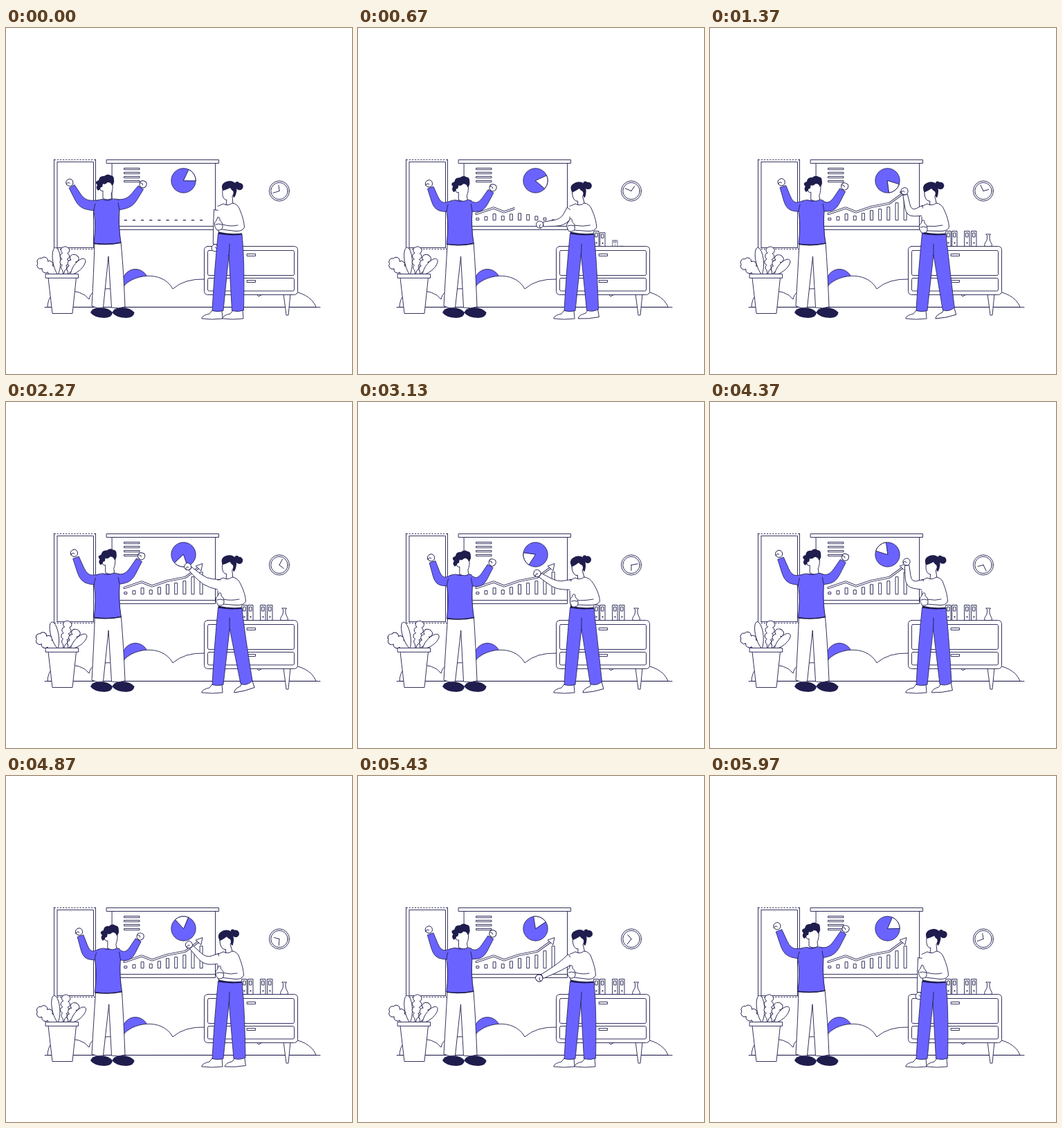
An HTML page that plays this animation: 500x500 px, repeating every 6 s.

```html
<!DOCTYPE html>
<html lang="en">
<head>
<meta charset="utf-8">
<title>Presentation</title>
<style>
  html, body { margin: 0; width: 100%; height: 100%; overflow: hidden; background: #fff; }
  svg { display: block; width: 100vw; height: 100vh; }
  .o { fill: #fff; stroke: #1f1d4d; stroke-width: .9; stroke-linejoin: round; stroke-linecap: round; }
  .b { fill: #6a63ff; stroke: #1f1d4d; stroke-width: .8; stroke-linejoin: round; }
  .l { fill: none; stroke: #1f1d4d; stroke-width: .9; stroke-linejoin: round; stroke-linecap: round; }
  .d { fill: #1f1d4d; }
  .w { fill: #fff; }
  .f { fill: #6a63ff; }
</style>
</head>
<body>
<svg viewBox="0 0 500 500">
  <defs>
    <clipPath id="reveal"><rect id="wipe" x="166" y="228" width="0" height="46"/></clipPath>
    <g id="fist">
      <path class="o" d="M-5 1Q-6-4-1-5Q4-6 5-1Q5 4 1 5Q-4 5-5 1Z"/>
      <path class="l" d="M-5 0Q-1-2 0 1"/>
    </g>
    <path id="shoe" class="d" d="M122 411Q124 405 134 404Q147 403 154 411Q154 418 142 419Q126 418 122 411Z"/>
    <path id="sole" class="o" d="M283 419Q284 415 294 413L298 408H312L313 420Q298 422 283 420Z"/>
  </defs>

  <!-- garden and floor -->
  <path class="l" d="M56 403.5H454"/>
  <circle class="b" cx="187" cy="367" r="18.5"/>
  <path class="o" d="M60 403Q61 381 82 380Q110 378 120 392Q122 378 142 377Q158 377 169 375C180 357 225 348 241 377Q258 362 287 363C330 366 355 375 365 388C383 376 436 373 448 403Z"/>

  <!-- poster -->
  <path class="l" d="M69.500 190V319M74 194V318M126.500 194V318M129.500 190V319M74 193.500H126M74 317.500H126"/>
  <path class="l" stroke-dasharray="1.5 2.6" d="M70 190.500H129M70 319.500H129"/>

  <!-- screen -->
  <rect class="o" x="153.500" y="195" width="149" height="96.500"/>
  <path class="l" d="M153 286.500H302"/>
  <rect class="o" x="145.500" y="190.500" width="162" height="5"/>
  <g id="rows"></g>
  <circle class="b" cx="256.500" cy="220.500" r="17.700"/>
  <path id="slice" class="o"/>
  <g id="bars"></g>
  <g clip-path="url(#reveal)">
    <path class="l" style="stroke-width:3.2" d="M171 268.5L196 260L211 266L233 258.5L259 253.5L279 239"/>
    <path class="l" style="stroke:#fff;stroke-width:1.5" d="M171 268.5L196 260L211 266L233 258.5L259 253.5L279 239"/>
    <path class="o" d="M274.5 237L284 233.5L282 243.5Z"/>
  </g>

  <!-- clock -->
  <circle class="o" cx="395" cy="235.500" r="14.600"/>
  <circle class="l" cx="395" cy="235.500" r="12.200"/>
  <g id="clock"><path class="l" d="M395 235.5L386 238.4M395 235.5L394 227.5"/></g>

  <!-- cabinet -->
  <g id="books"></g>
  <g id="vase"><path class="o" d="M399 298H405.500L404 300V304Q404 307 406 310Q409 315 406 315.500H398.500Q395 315 398 310Q400.500 307 400.500 304V300Z"/></g>
  <path class="o" d="M401 384L405 415H408L411 384Z"/>
  <rect class="o" x="286.500" y="315.500" width="135" height="70" rx="5"/>
  <rect class="o" x="291.500" y="321.500" width="125" height="36" rx="2"/>
  <rect class="o" x="291.500" y="361.500" width="125" height="18.500" rx="2"/>
  <rect class="o" x="348.500" y="326.500" width="12" height="3"/>
  <rect class="o" x="348.500" y="364.500" width="12" height="3"/>

  <!-- plant -->
  <g id="plant"></g>
  <path class="o" d="M61 361L67 412.500H96L101.500 361Z"/>
  <rect class="o" x="57.500" y="355.500" width="47" height="5.800"/>

  <!-- man -->
  <use href="#shoe"/><use href="#shoe" x="31.500"/>
  <path id="trousers" class="o"/>
  <path id="armL" class="b"/><path id="armR" class="b"/>
  <use id="fistL" href="#fist"/><use id="fistR" href="#fist"/>
  <g id="chest">
    <path class="f" d="M131 249Q146 246 162 248L164 258Q163 285 166 310Q147 314 127 311Q130 285 127.500 263Z"/>
    <path class="l" d="M129 254Q126 264 127.500 268Q130 285 127 311Q147 314 166 310Q162 285 164 264L162 253M131 249.500Q135 247.500 140 247.500Q147 251 154 247Q160 246.500 163 248.500"/>
    <path class="d" d="M127 310.500Q147 313.500 166 309.500V311Q147 315 127 312.200Z"/>
  </g>
  <g id="headM">
    <path class="o" d="M139 222L138 229Q134 231 137 235Q139 236 140 235L140 246Q147 250 153 246L152 240Q155 234 154 222Z"/>
    <path class="d" d="M133 235Q129 231 132 227Q127 222 134 220Q135 213 142 214Q147 210 151 213Q156 213 156 219Q157 225 153 228Q152 223 147 223Q143 227 140 225L139 230Q136 229 136 233Z"/>
  </g>

  <!-- woman -->
  <use href="#sole"/>
  <use id="step" href="#sole"/>
  <path id="pointer" class="o"/>
  <use id="fistW" href="#fist"/>
  <path id="pants" class="b"/>
  <path id="seam" class="l"/>
  <g id="headW">
    <path class="o" d="M314 231Q311.500 239 314 245Q316 249 319 248.500L318 255Q324 258 328 254L327 243Q332 238 330 230Z"/>
    <path class="d" d="M313 235Q310 226 316 223Q326 218 333 226Q335 237 330 245Q328 245 328 241Q330 236 326 234L324 231Q318 234 313 235Z"/>
    <circle class="d" cx="337.500" cy="229" r="5.200"/>
    <circle class="d" cx="334" cy="225" r="3"/>
  </g>
  <path id="topFill" class="w"/>
  <path id="topLine" class="l"/>
  <path class="d" d="M307 294.500Q324 298.500 341 296.500V298.800Q323 300.500 306.500 297.500Z"/>
  <path id="clutch" class="o" d="M302 287Q300 281 303.500 279L305.500 274.500Q309.500 272 309 278Q313.500 281 313 288Q312 293 305 292ZM303 284Q307 282 312 284"/>
</svg>
<script>
const LOOP = 6000;
const TIMES = [0, 1370, 2270, 3130, 4370, 5430, 5970];
const $ = id => document.getElementById(id);
const set = (id, key, val) => $(id).setAttribute(key, val);
const move = (id, x, y, turn = 0) => set(id, 'transform', `translate(${x} ${y}) rotate(${turn})`);
const mix = (a, b, p) => a.map((v, i) => v + (b[i] - v) * p);
const smooth = p => p * p * (3 - 2 * p);
const wave = (t, period) => (1 - Math.cos(2 * Math.PI * t / period)) / 2;
const grow = (t, start, span) => smooth(Math.min(1, Math.max(0, (t - start) / span)));
const polar = ([x, y], r, deg) => {
  const a = deg * Math.PI / 180;
  return [x + r * Math.cos(a), y + r * Math.sin(a)];
};

// Monotone cubic through values placed at TIMES
function track(vals) {
  const rate = i => (vals[i + 1] - vals[i]) / (TIMES[i + 1] - TIMES[i]);
  const slope = vals.map((_, i) => {
    if (i === 0 || i === vals.length - 1) return 0;
    const a = rate(i - 1), b = rate(i);
    return a * b > 0 ? 2 * a * b / (a + b) : 0;
  });
  return t => {
    const last = TIMES.length - 1;
    if (t >= TIMES[last]) return vals[last];
    const i = TIMES.findIndex(k => k > t) - 1;
    const h = TIMES[i + 1] - TIMES[i], u = (t - TIMES[i]) / h, v = 1 - u;
    return vals[i] * v * v * (1 + 2 * u) + vals[i + 1] * u * u * (3 - 2 * u)
      + h * (slope[i] * u * v * v - slope[i + 1] * u * u * v);
  };
}

// Tapered limb from shoulder s over elbow e to wrist w, with half widths a, b, c
function limb(s, e, w, a, b, c) {
  const shift = (p, q, r) => {
    const dx = q[0] - p[0], dy = q[1] - p[1], n = Math.hypot(dx, dy) || 1;
    return [-dy / n * r, dx / n * r];
  };
  const n1 = shift(s, e, a), n2 = shift(s, w, b), n3 = shift(e, w, c);
  const edge = d => {
    const at = (p, n) => p.map((v, i) => v + n[i] * d);
    const top = at(s, n1), bend = at(e, n2), end = at(w, n3);
    return [top, mix(top, bend, .55), bend, mix(end, bend, .6), end];
  };
  const l = edge(1), r = edge(-1);
  return `M${l[0]}L${l[1]}Q${l[2]} ${l[3]}L${l[4]}L${r[4]}L${r[3]}Q${r[2]} ${r[1]}L${r[0]}Z`;
}

// Static repeats
$('rows').innerHTML = [0, 1, 2, 3].map(i =>
  `<rect class="o" x="171" y="${202.5 + 6 * i}" width="22" height="2.2"/>`).join('');

const HEIGHTS = [3, 5, 9, 6, 10, 14, 16, 19, 25, 32];
$('bars').innerHTML = HEIGHTS.map((_, i) =>
  `<rect class="o" x="${171.2 + 12.15 * i}" width="3.6"/>`).join('');
const bars = [...$('bars').children];

const BOOKS = [341, 350, 368, 378];
$('books').innerHTML = BOOKS.map(x => `<g><rect class="o" x="${x}" y="293.500" width="7" height="22"/>
  <rect class="o" x="${x + 2}" y="296" width="3" height="6"/><circle class="d" cx="${x + 3.5}" cy="310.500" r="1.100"/></g>`).join('');
const props = [...$('books').children, $('vase')];

// x, tilt, length, half width, lobes (0 = plain), sway
const LEAVES = [
  [75, -52, 38, 11, 3, -6],
  [75, -5, 40, 6, 0, -9],
  [83, 4, 46, 6, 4, 6],
  [89, 22, 35, 6, 3, 6],
  [93, 42, 31, 6, 0, 7]
];
function leafPath(len, w, lobes) {
  if (!lobes) return `M0 0C${-w * 1.5} ${-len * .4} ${-w} ${-len} 0 ${-len}C${w} ${-len} ${w * 1.5} ${-len * .4} 0 0Z`;
  const pts = [], r = len * .4 / lobes;
  for (let i = 1; i <= lobes; i++) pts.push([w * (.25 + .35 * Math.sin(i / lobes * 2.6)), -len * (.12 + .76 * i / lobes)]);
  const arc = (x, y) => `A${r} ${r} 0 0 1 ${x} ${y}`;
  return `M0 0L${-w * .3} ${-len * .15}` + pts.map(([x, y]) => arc(-x, y)).join('')
    + pts.reverse().map(([x, y]) => arc(x, y)).join('') + arc(w * .3, -len * .15) + 'Z';
}
$('plant').innerHTML = LEAVES.map(([, , len, w, lobes]) =>
  `<g><path class="o" d="${leafPath(len, w, lobes)}"/></g>`).join('');
const leaves = [...$('plant').children];

// Man: elbow and fist for both arms, then head shift
const START = [110, 255, 92, 223.500, 179, 253, 198, 226, 0, 0];
const LOW = [112, 255, 97, 217, 177, 253, 196, 221, 3, 0];
const HIGH = [117, 260, 106, 225.500, 177, 262, 194, 232.500, 7, 3];

const upper = track([98, 168, 191, 177, 180, 144, 98]);
const fore = track([95, 259, 222, 212, 265, 152, 95]);
const stride = track([0, 14, 18, 13, 8, 0, 0]);
const bulge = track([0, 1, 2, 5, -1, -1, 0]);
const clutchX = track([0, 1, 2, 5, 2, 1, 0]);
const clutchY = track([0, 4, 2, 4, 2, 0, 0]);

function drawChart(t) {
  const c = [256.5, 220.5], turn = t / LOOP * 360;
  const a = polar(c, 17.7, turn - 65), b = polar(c, 17.7, turn);
  set('slice', 'd', `M${c}L${a}A17.7 17.7 0 0 1 ${b}Z`);
  set('clock', 'transform', `rotate(${turn} 395 235.5)`);
  bars.forEach((bar, i) => {
    const h = HEIGHTS[i] * grow(t, 70 * i, 500);
    bar.setAttribute('y', 277.7 - h);
    bar.setAttribute('height', Math.max(.01, h));
  });
  set('wipe', 'width', 122 * grow(t, 100, 1150));
  props.forEach((p, i) => {
    const k = grow(t, 200 + 150 * i, 400);
    p.setAttribute('transform', `translate(0 ${315.5 * (1 - k)}) scale(1 ${k})`);
    p.setAttribute('visibility', k > 0 ? 'visible' : 'hidden');
  });
}

function drawPlant(t) {
  const p = wave(t, LOOP);
  LEAVES.forEach(([x, tilt, , , , sway], i) =>
    leaves[i].setAttribute('transform', `translate(${x} 357) rotate(${tilt + sway * p})`));
}

function drawMan(t) {
  const p = wave(t, 2000), d = 1.5 * p;
  const m = mix(t < 1000 ? START : LOW, HIGH, p);
  const arm = (name, shoulder, i, turn) => {
    const elbow = m.slice(i, i + 2), fist = m.slice(i + 2, i + 4);
    set('arm' + name, 'd', limb(shoulder, elbow, mix(fist, elbow, .17), 8, 7, 4.6));
    move('fist' + name, ...fist, turn);
  };
  arm('L', [134 + d, 257 + d], 0, -20);
  arm('R', [158 + d, 256 + d], 4, 25);
  move('chest', d, d);
  move('headM', m[8], m[9]);
  set('trousers', 'd', `M${128 + d} ${311 + d}Q127 350 124 402Q132 406 140.5 404L${148 + d / 2} 330L152.500 404Q163 406 172 403Q170 350 ${166 + d} ${309 + d}Z`);
}

function drawWoman(t) {
  const shoulder = [308, 264];
  const elbow = polar(shoulder, 21, upper(t));
  const wrist = polar(elbow, 28, fore(t)), fist = polar(elbow, 33, fore(t));
  set('pointer', 'd', limb(shoulder, elbow, wrist, 7.5, 5.5, 3.3));
  move('fistW', ...fist, fore(t) + 90);

  const s = stride(t), h = s * .7;
  set('step', 'transform', `translate(${30 + s * .95} 0) rotate(${-s * .8} 283 420)`);
  set('pants', 'd', `M306.500 297Q324 300 341 298Q345 335 ${343.5 + h} ${408 - h * .4}Q${335 + h} 411 ${326.5 + h} ${408.5 - h * .1}L${322 + h * .1} 328L314 408.500Q306 411 298 408.500Q301 350 306.500 297Z`);
  set('seam', 'd', `M323 312Q323 320 ${322 + h * .1} 329`);

  const q = smooth(wave(t, 2000));
  set('headW', 'transform', `translate(${-q} ${q * 1.5}) rotate(${-11 * q} 321 252)`);

  const e = bulge(t), x = clutchX(t), y = clutchY(t);
  const back = `Q320 258 327 253Q335 254 ${338 + e * .5} 263Q${344 + e} 277 ${344.5 + e} 288Q${342 + e} 294`;
  set('topFill', 'd', `M314 254${back} 338 294L341 297Q324 298 307 295Q305 280 306 268Q306 258 314 254Z`);
  set('topLine', 'd', `M306 257.500Q310 256 314 254${back} 332 293.500L${311 + x} ${291 + y * .5}M306 273Q306 285 307.500 295M${313 + x} ${284 + y * .6}Q325 287.500 ${335 + e} 285`);
  move('clutch', x, y);
}

function render(t) {
  drawChart(t);
  drawPlant(t);
  drawMan(t);
  drawWoman(t);
}

const begin = performance.now();
function tick() {
  render((performance.now() - begin) % LOOP);
  requestAnimationFrame(tick);
}
tick();
</script>
</body>
</html>
```
